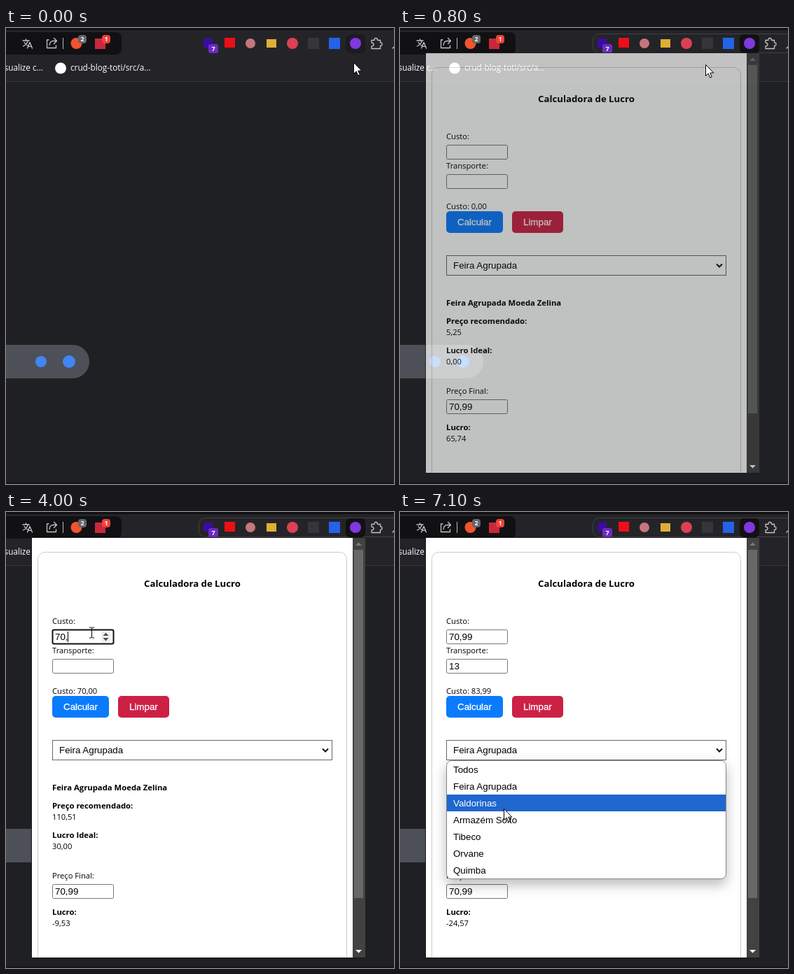
Recreate the animation shown at these times as an HTML page. Size 554 px wide and 652 px high, loop 8000 ms.

```html
<!DOCTYPE html>
<html lang="pt-BR">
<head>
<meta charset="utf-8">
<title>Calculadora de Lucro</title>
<style>
html, body { margin: 0; width: 100%; height: 100%; overflow: hidden; background: #1f2023; }
svg { display: block; position: absolute; left: 0; top: 0; }
text { font: 11.2px "Open Sans", "Noto Sans", sans-serif; white-space: pre; }
.bar { font-size: 11.75px; fill: #fff; }
.badge { font: bold 9px "Open Sans", sans-serif; fill: #fff; text-anchor: middle; }
.bold { font-size: 11.3px; font-weight: 700; }
.title { font-size: 13.2px; font-weight: 700; text-anchor: middle; }
.ctl { font: 13.333px "Liberation Sans", Arial, sans-serif; }
.btn { fill: #fff; stroke: #fff; stroke-width: .3px; }
.line { fill: none; stroke: #c3c4c8; stroke-width: 1.3; stroke-linecap: round; stroke-linejoin: round; }
#menu rect.panel { filter: drop-shadow(0 8px 9px rgba(0,0,0,.27)); }
</style>
</head>
<body>
<svg width="554" height="652" viewBox="0 0 554 652">
  <defs>
    <clipPath id="view"><rect x="37" y="37" width="458" height="600"/></clipPath>
    <g id="spin">
      <rect x="136" y="3" width="13" height="15" fill="#efefef"/>
      <path d="M138.5 9L142.5 4.5L146.5 9ZM138.5 12L142.5 16.5L146.5 12Z" fill="#505050"/>
    </g>
  </defs>

  <g id="browser">
    <rect width="554" height="77" fill="#242428"/>
    <rect width="554" height="3" fill="#111114"/>
    <rect x="-20" y="6" width="185" height="32" rx="8" fill="#111114"/>
    <path d="M0 76.5H554" stroke="#36363a"/>
    <rect y="650" width="554" height="2" fill="#151518"/>

    <path class="line" d="M24 18H33M28.5 16V18M31.5 18Q29.5 24 24.5 26M26 20.5Q28 24 31 25M30.5 29L34 20.5L37.5 29M31.7 26.3H36.3"/>
    <path class="line" d="M61 17H58.5V28.5H71.5V25M62 24.5Q62.5 18.5 68 18.5H72M68.5 14.5L72.5 18.5L68.5 22.5"/>
    <path d="M81.5 14V30" stroke="#b9babd"/>
    <circle cx="100.500" cy="22" r="8" fill="#f4532d"/>
    <rect x="103" y="10" width="12" height="12" rx="4" fill="#62656a"/>
    <text class="badge" x="109" y="19.300">2</text>
    <rect x="127" y="15" width="15" height="15" fill="#c9283a"/>
    <rect x="137" y="10" width="12" height="12" rx="4" fill="#ee4137"/>
    <text class="badge" x="143" y="19.300">1</text>

    <text class="bar" x="53" y="61" text-anchor="end">Visualize c...</text>
    <circle cx="78" cy="57.500" r="8" fill="#fff"/>
    <text class="bar" x="92" y="61">crud-blog-toti/src/a...</text>

    <rect id="pill" x="275.500" y="8.500" width="290" height="27" rx="9" fill="none" stroke="#414146"/>
    <rect id="hover" x="485" y="9" width="28" height="27" rx="6"/>
    <rect x="282" y="15" width="13" height="13" fill="#3a0ca3"/>
    <rect x="289" y="23" width="14" height="13" rx="3" fill="#6c2bc0"/>
    <text class="badge" x="296" y="33">7</text>
    <rect x="312" y="14" width="15" height="14" fill="#ec1016"/>
    <circle cx="349" cy="22" r="7" fill="#c5767c"/>
    <rect x="372" y="16" width="14" height="12" fill="#e0ae37"/>
    <circle cx="409" cy="22" r="8" fill="#dc4055"/>
    <rect x="431" y="14" width="16" height="16" fill="#35363a"/>
    <rect x="461" y="14" width="16" height="16" fill="#2463e8"/>
    <circle cx="499" cy="22" r="8" fill="#8138df"/>
    <path class="line" d="M522 17.500H526Q525.500 14.500 528 14.500T530.500 17.500H534.500V21Q537 20.500 537 23T534.500 25.500V29.500H522V25.800Q525 25.800 525 23.500T522 21.200Z"/>
    <path class="line" d="M552 29L555 26"/>

    <rect x="-40" y="453" width="159" height="48" rx="24" fill="#4d5057"/>
    <circle cx="50" cy="477" r="8" fill="#4285f4"/>
    <circle cx="90" cy="477" r="9" fill="#4285f4"/>
  </g>

  <g id="popup">
    <rect x="36" y="36" width="477" height="602" fill="#18181b"/>
    <rect x="37" y="37" width="458" height="600" fill="#fff"/>
    <rect x="495" y="37" width="18" height="600" fill="#424242"/>
    <rect x="497" y="54" width="13" height="498" fill="#686868"/>
    <path d="M499 48L503.500 43.500L508 48Z" fill="#7b7b7b"/>
    <path d="M499 626L503.500 630.500L508 626Z" fill="#fff"/>
    <g clip-path="url(#view)">
      <rect x="45.500" y="57.500" width="441" height="620" rx="10" fill="none" stroke="#ccc"/>
      <text class="title" x="266" y="107">Calculadora de Lucro</text>
      <g id="form"></g>
      <rect x="66" y="263" width="81" height="31" rx="5" fill="#0a7bfb"/>
      <text class="ctl btn" x="82" y="283">Calcular</text>
      <rect x="160" y="263" width="73" height="31" rx="5" fill="#cc2044"/>
      <text class="ctl btn" x="176" y="283">Limpar</text>
      <rect x="66.500" y="326.500" width="399" height="28" fill="#fff" stroke="#686868"/>
      <text class="ctl" x="76" y="345">Feira Agrupada</text>
      <path d="M452 338.500L456 342.500L460 338.500" fill="none" stroke="#111" stroke-width="2"/>
      <path id="caret" stroke="#000"/>
      <g id="menu"></g>
    </g>
  </g>

  <path id="arrow" d="M.5 .5V16.500L4.200 13L6.800 19L9.300 18L6.700 12.200H11.800Z" fill="#fff" stroke="#000"/>
  <path id="beam" d="M-3.500 -7.500H-1L0 -6.500L1 -7.500H3.500M0 -6.500V6.500M-3.500 7.500H-1L0 6.500L1 7.500H3.500" fill="none" stroke="#000"/>
</svg>

<script>
const LOOP = 8000, STEP = 100;
const $ = id => document.getElementById(id);
const show = (el, on) => { el.style.display = on ? '' : 'none'; };
const money = n => n.toFixed(2).replace('.', ',');
const num = s => parseFloat(s.replace(',', '.')) || 0;

const label = (x, y, s, cls = '', id = '') => `<text x="${x}" y="${y}" class="${cls}" id="${id}">${s}</text>`;
const input = (id, y) => `<g id="${id}" transform="translate(0 ${y})">
  <rect x="66.5" y=".5" width="87" height="20" rx="2" fill="#fff"/>
  <text class="ctl" x="70" y="15"></text><use href="#spin"/></g>`;

$('form').innerHTML =
  label(66, 160, 'Custo:') + input('cost', 168) +
  label(66, 202, 'Transporte:') + input('freight', 210) +
  label(66, 260, '', '', 'total') +
  label(66, 398, 'Feira Agrupada Moeda Zelina', 'bold') +
  label(66, 424, 'Preço recomendado:', 'bold') + label(66, 440, '', '', 'price') +
  label(66, 466, 'Lucro Ideal:', 'bold') + label(66, 482, '', '', 'ideal') +
  label(66, 524, 'Preço Final:') + input('final', 532) +
  label(66, 576, 'Lucro:', 'bold') + label(66, 592, '', '', 'profit');

const shops = ['Todos', 'Feira Agrupada', 'Valdorinas', 'Armazém Solto', 'Tibeco', 'Orvane', 'Quimba'];
$('menu').innerHTML =
  '<rect class="panel" x="66.5" y="355.5" width="399" height="169" rx="7" fill="#fff" stroke="#858585"/>' +
  '<rect id="mark" x="67" width="398" height="24" fill="#1f66cd"/>' +
  shops.map((s, i) => label(76, 373 + 24 * i, s, 'ctl shop')).join('');
const rows = [...document.querySelectorAll('.shop')];

const fields = { cost: 168, freight: 210, final: 532 };

// time, focused field, cost, freight, caret visible
const states = [
  [0, '', '', '', 0],
  [1300, 'freight', '', '', 1],
  [1700, 'freight', '', '', 0],
  [2000, 'cost', '', '', 1],
  [2400, 'cost', '', '', 0],
  [2800, 'cost', '', '', 1],
  [3000, 'cost', '7', '', 1],
  [3200, 'cost', '70', '', 1],
  [3600, 'cost', '70', '', 0],
  [4000, 'cost', '70,', '', 1],
  [4300, 'cost', '70,9', '', 1],
  [4600, 'cost', '70,99', '', 1],
  [4900, 'freight', '70,99', '', 1],
  [5300, 'freight', '70,99', '1', 1],
  [5600, 'freight', '70,99', '13', 1],
  [6100, 'freight', '70,99', '13', 0],
  [6500, '', '70,99', '13', 0]
];

// time, x, y of the pointer
const path = [
  [0, 496, 49], [400, 497, 26], [700, 497, 26], [900, 375, 77],
  [1100, 220, 155], [1300, 100, 214], [1400, 93, 191], [1700, 110, 178],
  [2000, 112, 177], [2400, 122, 172], [5800, 122, 172],
  [6100, 140, 265], [6400, 155, 336], [6600, 155, 336], [7100, 148, 424]
];

// time, opacity, vertical shift of the popup
const fade = [[600, 0, -4], [700, .25, -2], [800, .72, -1], [900, 1, 0]];

function tween(keys, t) {
  if (t <= keys[0][0]) return keys[0].slice(1);
  const i = keys.findIndex(k => k[0] > t);
  if (i < 0) return keys[keys.length - 1].slice(1);
  const a = keys[i - 1], b = keys[i], p = (t - a[0]) / (b[0] - a[0]);
  return a.slice(1).map((v, j) => v + (b[j + 1] - v) * p);
}

function drawField(id, value, focused, hovered) {
  const g = $(id), box = g.querySelector('rect');
  g.querySelector('text').textContent = value;
  box.setAttribute('stroke', focused ? '#101010' : '#767676');
  box.setAttribute('stroke-width', focused ? 2 : 1);
  show(g.querySelector('use'), focused || hovered);
}

function draw(t) {
  const [, focus, cost, freight, caret] = states.filter(s => s[0] <= t).pop();
  const [x, y] = tween(path, t);
  const [alpha, dy] = tween(fade, t);
  const over = t < 900 ? '' : Object.keys(fields).find(id =>
    x > 66 && x < 154 && y > fields[id] && y < fields[id] + 21) || '';

  show($('pill'), t >= 200);
  $('hover').setAttribute('fill', t < 200 ? '#1c1c1f' : '#111114');
  $('popup').setAttribute('opacity', alpha);
  $('popup').setAttribute('transform', `translate(0 ${dy})`);

  const values = { cost, freight, final: '70,99' };
  for (const id in fields) drawField(id, values[id], focus === id, over === id);

  const sum = num(cost) + num(freight);
  $('total').textContent = 'Custo: ' + money(sum);
  $('price').textContent = money(5.25 + sum * 2 / 1.33);
  $('ideal').textContent = money(sum * 3 / 7);
  $('profit').textContent = money(70.99 - 5.25 - sum / .93);

  show($('caret'), caret);
  if (caret) {
    const text = $(focus).querySelector('text');
    const cx = Math.floor(70 + (values[focus] ? text.getComputedTextLength() : 0)) + .5;
    $('caret').setAttribute('d', `M${cx} ${fields[focus] + 3}v15`);
  }

  show($('menu'), t >= 6600);
  const row = y < 356 ? 1 : Math.floor((y - 356) / 24);
  $('mark').setAttribute('y', 356 + 24 * row);
  rows.forEach((r, i) => r.setAttribute('fill', i === row ? '#fff' : '#000'));

  $('arrow').setAttribute('transform', `translate(${Math.round(x)} ${Math.round(y)})`);
  $('beam').setAttribute('transform', `translate(${Math.round(x) + .5} ${Math.round(y) + .5})`);
  show($('arrow'), !over);
  show($('beam'), over);
}

function tick() {
  const t = performance.now() % LOOP;
  draw(Math.floor(t / STEP) * STEP);
  requestAnimationFrame(tick);
}
tick();
</script>
</body>
</html>
```
